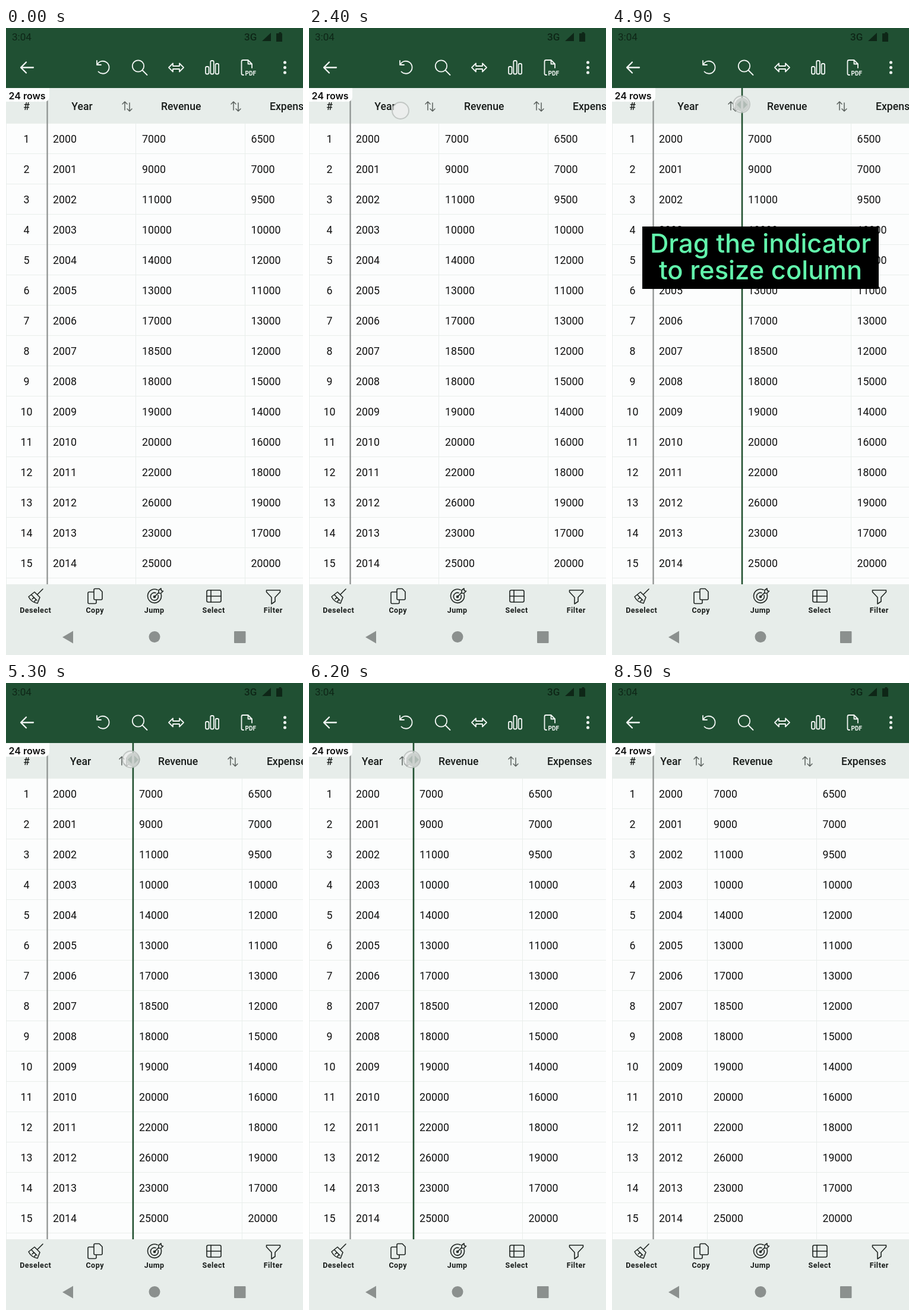
Write an HTML page that moves like this. It is 500 px wide and 1055 px high and loops after 8.6 s.

```html
<!DOCTYPE html>
<html lang="en">
<head>
<meta charset="utf-8">
<title>Resize a column</title>
<style>
  html, body { margin: 0; width: 100%; height: 100%; overflow: hidden; background: #e7edea; }
  svg { display: block; width: 500px; height: 1055px; font-family: Roboto, sans-serif; }
  .cell { font-size: 17.8px; fill: #111; }
  .head { font-size: 17.6px; font-weight: 500; fill: #181c1a; }
  .label { font-size: 12.5px; font-weight: 600; letter-spacing: .5px; fill: #181c1a; }
  .mid { text-anchor: middle; }
  .line { fill: none; stroke-linecap: round; stroke-linejoin: round; }
  .bar { stroke: #f2f6f4; stroke-width: 1.8; }
  .tool { stroke: #1f2522; stroke-width: 1.6; }
  .sort { stroke: #5a605d; stroke-width: 1.5; }
  .grid { stroke: #e9eeeb; stroke-width: 1; }
  .caption { font-family: Inter, sans-serif; font-weight: 500; fill: #62f5ac; text-anchor: middle; }
</style>
</head>
<body>
<svg viewBox="0 0 500 1055">
  <defs>
    <path id="sort" class="line sort" d="M-4 6V-8M-8-4l4-4 4 4M4-6V8M0 4l4 4 4-4"/>
  </defs>

  <rect width="500" height="1055" fill="#e7edea"/>
  <rect y="160" width="500" height="776" fill="#fcfdfd"/>
  <g id="rules" class="grid"></g>
  <g id="numbers" class="cell mid"></g>
  <text class="head mid" x="34.5" y="137.5">#</text>
  <g id="yearCells" class="cell"></g>
  <text id="yearHead" class="head mid" x="128" y="137.5">Year</text>

  <g id="rest">
    <path class="grid" d="M218.5 160V936M402.5 160V936"/>
    <use href="#sort" x="204" y="132"/>
    <use href="#sort" x="387" y="132"/>
    <text class="head" x="261" y="137.5">Revenue</text>
    <text class="head" x="444" y="137.5">Expenses</text>
    <g id="moneyCells" class="cell"></g>
  </g>

  <path d="M69.5 101V936" stroke="#8b8f8d" stroke-width="2.2"/>
  <path d="M0 101H73V116a8 8 0 0 1-8 8H0z" fill="#fdfefe"/>
  <text x="4.500" y="119.500" font-family="Inter, sans-serif" font-size="16" font-weight="600" fill="#0c0c0c">24 rows</text>

  <g id="handle">
    <path d="M219 101V936" stroke="#21502f" stroke-width="2.6"/>
    <circle cx="219" cy="129" r="11.500" fill="#8d9a93"/>
    <path d="M217 122v14l-7-7zM221 122v14l7-7z" fill="#3d5c4a"/>
  </g>

  <rect width="500" height="101" fill="#205033"/>
  <g fill="#0e2617">
    <text x="10" y="21" font-size="17">3:04</text>
    <text x="401" y="21" font-size="17" font-weight="500">3G</text>
    <path d="M446 8V22H431zM457 9h2.500V7h4v2H465V23H455V9z"/>
  </g>
  <g class="line bar">
    <path d="M46 66.500H25M34 57.500l-9 9 9 9" stroke-width="2.300"/>
    <path d="M154 61A10.500 10.500 0 1 1 155.500 73.500M153 55v7h7"/>
    <circle cx="222.500" cy="64" r="9.700"/>
    <path d="M229.500 71l8 8"/>
    <path d="M274 66.500l7-7v4.500h11v-4.500l7 7-7 7V69H281v4.500z"/>
    <rect x="336" y="65" width="5.500" height="12.500" rx="2.200"/>
    <rect x="344.300" y="55" width="5.500" height="22.500" rx="2.200"/>
    <rect x="352.600" y="60" width="5.500" height="17.500" rx="2.200"/>
    <path d="M400 79h-1a2.500 2.500 0 0 1-2.500-2.500V56.500a2.500 2.500 0 0 1 2.500-2.500h8.500l6.500 6.500V67M407.500 54v6.500H414"/>
  </g>
  <g fill="#f2f6f4">
    <text x="402.500" y="79.500" font-size="10" font-weight="700">PDF</text>
    <circle cx="469.500" cy="58" r="2.500"/>
    <circle cx="469.500" cy="66.500" r="2.500"/>
    <circle cx="469.500" cy="75" r="2.500"/>
  </g>

  <rect y="936" width="500" height="119" fill="#e7edea"/>
  <g class="line tool">
    <path d="M62 944l-9 9M48 949l9 9-4 10c-6-1-12-5-15-11zM43 954l9 9M44 961l3-3M48 965l2-3"/>
    <path d="M148 945.500a2 2 0 0 1 2-2h7l5 5V960a2 2 0 0 1-2 2H150a2 2 0 0 1-2-2zM148 949h-8a2 2 0 0 0-2 2V966.500a2 2 0 0 0 2 2H150a2 2 0 0 0 2-2V962"/>
    <path d="M255 945.500a11.500 11.500 0 1 0 6 7M252 950.500a6.500 6.500 0 1 0 4 4M250 957l7-7v-4l4-3 .500 4 3 .500-3.500 3.500h-4"/>
    <circle cx="250" cy="957" r="1.500"/>
    <rect x="338" y="946" width="24" height="20" rx="2.500"/>
    <path d="M345 946v20M338 956h24"/>
    <path d="M438.500 946h23v3l-8.500 9v7l-6 4V958l-8.500-9z"/>
  </g>
  <g id="labels" class="label mid"></g>
  <g fill="#8b908e">
    <path d="M95 1025l18-10.500v21z"/>
    <circle cx="250" cy="1024.500" r="9.500"/>
    <rect x="384" y="1015" width="19.500" height="20" rx="1"/>
  </g>

  <g id="press">
    <path d="M148 142L132 181 150 180 147 232 192 222 163 177 178 170z"
      fill="#fcfdfd" stroke="#b3211e" stroke-width="8" stroke-linejoin="round"/>
    <rect x="9" y="259" width="482" height="91"/>
    <g class="caption" font-size="37.500">
      <text x="250" y="297">Long press on the header</text>
      <text x="250" y="335">to show resize indicator</text>
    </g>
  </g>
  <g id="drag">
    <rect x="51" y="334" width="398" height="105"/>
    <g class="caption" font-size="43.500">
      <text x="250" y="377.500">Drag the indicator</text>
      <text x="250" y="422.500">to resize column</text>
    </g>
  </g>
  <circle id="touch" r="14" fill="#eee" fill-opacity=".65" stroke="#b4b9b7" stroke-opacity=".75" stroke-width="2"/>
</svg>
<script>
const LOOP = 8600, STEP = 100, LAG = 50;
const $ = id => document.getElementById(id);

function add(parent, tag, attrs, text) {
  const el = document.createElementNS('http://www.w3.org/2000/svg', tag);
  for (const key in attrs) el.setAttribute(key, attrs[key]);
  if (text !== undefined) el.textContent = text;
  $(parent).append(el);
}

const revenue = [70, 90, 110, 100, 140, 130, 170, 185, 180, 190, 200, 220, 260, 230, 250];
const expenses = [65, 70, 95, 100, 120, 110, 130, 120, 150, 140, 160, 180, 190, 170, 200];

revenue.forEach((value, i) => {
  const y = 192.5 + 51 * i;
  add('numbers', 'text', { x: 34.5, y }, i + 1);
  add('yearCells', 'text', { x: 79, y }, 2000 + i);
  add('moneyCells', 'text', { x: 229, y }, value * 100);
  add('moneyCells', 'text', { x: 412.5, y }, expenses[i] * 100);
});
for (let y = 160.5; y < 936; y += 51) add('rules', 'path', { d: `M0 ${y}H500` });
add('rules', 'path', { d: 'M.5 160V936' });
['Deselect', 'Copy', 'Jump', 'Select', 'Filter'].forEach((name, i) =>
  add('labels', 'text', { x: 49.7 + 100 * i, y: 983.5 }, name));

// [time, offset of the column edge]
const edge = [[5200, 0], [5700, -25.5], [6400, -50], [7000, -55], [7300, -58]];

function valueAt(keys, t) {
  if (t <= keys[0][0]) return keys[0][1];
  for (let i = 1; i < keys.length; i++) {
    const [t0, a] = keys[i - 1], [t1, b] = keys[i];
    if (t < t1) return a + (b - a) * (t - t0) / (t1 - t0);
  }
  return keys[keys.length - 1][1];
}

const within = (t, from, to) => t >= from && t < to;
const show = (id, on) => $(id).setAttribute('visibility', on ? 'visible' : 'hidden');
const move = (id, x, y = 0) => $(id).setAttribute('transform', `translate(${x} ${y})`);

function draw(now) {
  const t = Math.floor(now % LOOP / STEP) * STEP;
  const dx = valueAt(edge, t);
  const holding = within(t, 2200, 3300);
  move('rest', dx);
  move('handle', dx);
  move('yearHead', dx / 2);
  show('press', within(t, 500, 2100));
  show('drag', within(t, 3500, 5200));
  show('handle', within(t, 2900, 8100));
  show('touch', holding || within(t, 4700, 7600));
  // The finger runs slightly ahead of the edge it drags.
  if (holding) move('touch', 154, 139);
  else move('touch', 218 + valueAt(edge, t + LAG), 128.5);
}

const start = performance.now();
function tick() {
  draw(performance.now() - start);
  requestAnimationFrame(tick);
}
tick();
</script>
</body>
</html>
```
